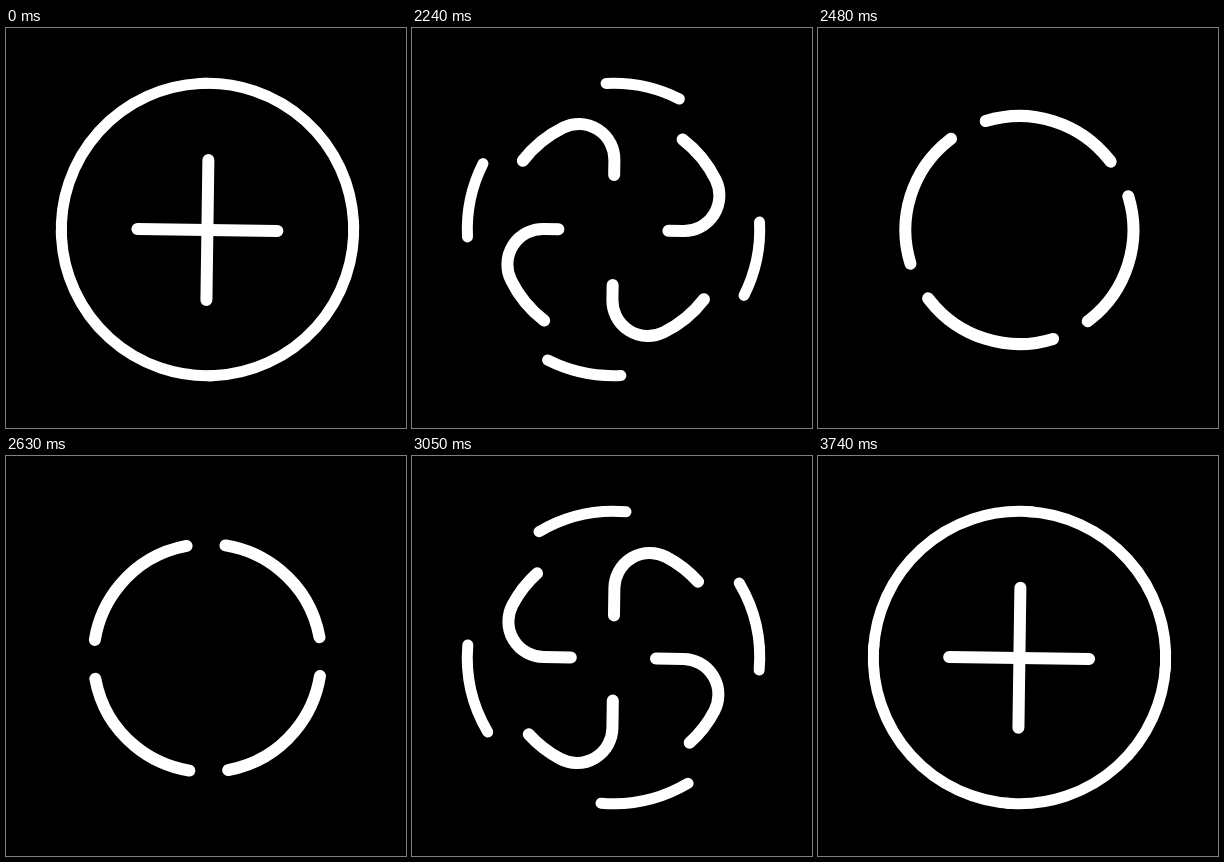
An HTML page with a canvas for the animation above (3890 ms loop, 400 by 400 pixels).

```html
<!DOCTYPE html>
<html lang="en">
<head>
<meta charset="utf-8">
<title>Swirling plus</title>
<style>
  html, body { margin: 0; height: 100%; overflow: hidden; background: #000; }
  canvas { display: block; }
</style>
</head>
<body>
<canvas id="stage" width="400" height="400"></canvas>
<script>
const ctx = document.getElementById('stage').getContext('2d');
const LOOP = 3890, HOLD = 2030, STEP = 30, STEPS = 58;
const RAD = Math.PI / 180;

// Each stroke leaves along an arm, bends onto the inner circle and bends back in.
const ARM = 70, INNER = 114, OUTER = 146.2;
const bend = (INNER ** 2 - ARM ** 2) / (2 * INNER);
const join = Math.atan2(bend, ARM);
const jx = INNER * Math.cos(join), jy = INNER * Math.sin(join);
const track = new Path2D(`M${-ARM} 0H${ARM}
  A${bend} ${bend} 0 0 0 ${jx} ${-jy}
  A${INNER} ${INNER} 0 1 0 ${jx} ${jy}
  A${bend} ${bend} 0 0 0 ${ARM} 0H${-ARM}`);
const travel = 2 * ARM + 2 * bend * (Math.PI / 2 + join) + INNER * (2 * Math.PI - 2 * join);

// step, distance travelled, speed
const keys = [
  [1, 17.3, 3], [8, 125, 32], [16, 412.5, 30], [27, 655.5, 18.5],
  [42, travel - 44, 7], [54, travel - 1.5, 0.3], [STEPS, travel - 1, 0]
];

function distance(n) {
  if (n < 1) return 0;
  const i = Math.max(1, keys.findIndex(k => k[0] >= n));
  const [n0, d0, v0] = keys[i - 1], [n1, d1, v1] = keys[i];
  const h = n1 - n0, u = (n - n0) / h, w = 1 - u;
  return w * w * ((1 + 2 * u) * d0 + u * h * v0) + u * u * ((1 + 2 * w) * d1 - w * h * v1);
}

function ring(from, to) {
  if (to <= from) return;
  for (let q = 0; q < 360; q += 90) {
    ctx.beginPath();
    ctx.arc(201.5, 201.5, OUTER, (from + q - 90) * RAD, (to + q - 90) * RAD);
    ctx.stroke();
  }
}

function draw(n) {
  const d = distance(n);
  ctx.fillStyle = '#000';
  ctx.fillRect(0, 0, 400, 400);
  ctx.strokeStyle = '#fff';
  ctx.lineCap = 'round';

  // Outer arcs shrink towards their start, then grow back from the far end.
  const turn = px => px / INNER / RAD;
  ctx.lineWidth = 11;
  ring(-2.9, 89.6 - turn(d));
  ring(2.4 + turn(travel - d), 94.9);

  ctx.lineWidth = 12;
  ctx.setLineDash([2 * ARM, 2000]);
  ctx.lineDashOffset = -d;
  for (let k = 0; k < 4; k++) {
    // Only one pair of strokes forms the plus at either end.
    if (k < 2 ? n >= 54 : n <= 1) continue;
    ctx.save();
    ctx.translate(201.4, 202);
    ctx.rotate((k * 90 + 0.8) * RAD);
    ctx.stroke(track);
    ctx.restore();
  }
  ctx.setLineDash([]);
}

function frame() {
  const t = performance.now() % LOOP - HOLD;
  draw(t < 0 ? 0 : Math.min(STEPS, Math.floor(t / STEP) + 1));
  requestAnimationFrame(frame);
}
frame();
</script>
</body>
</html>
```
